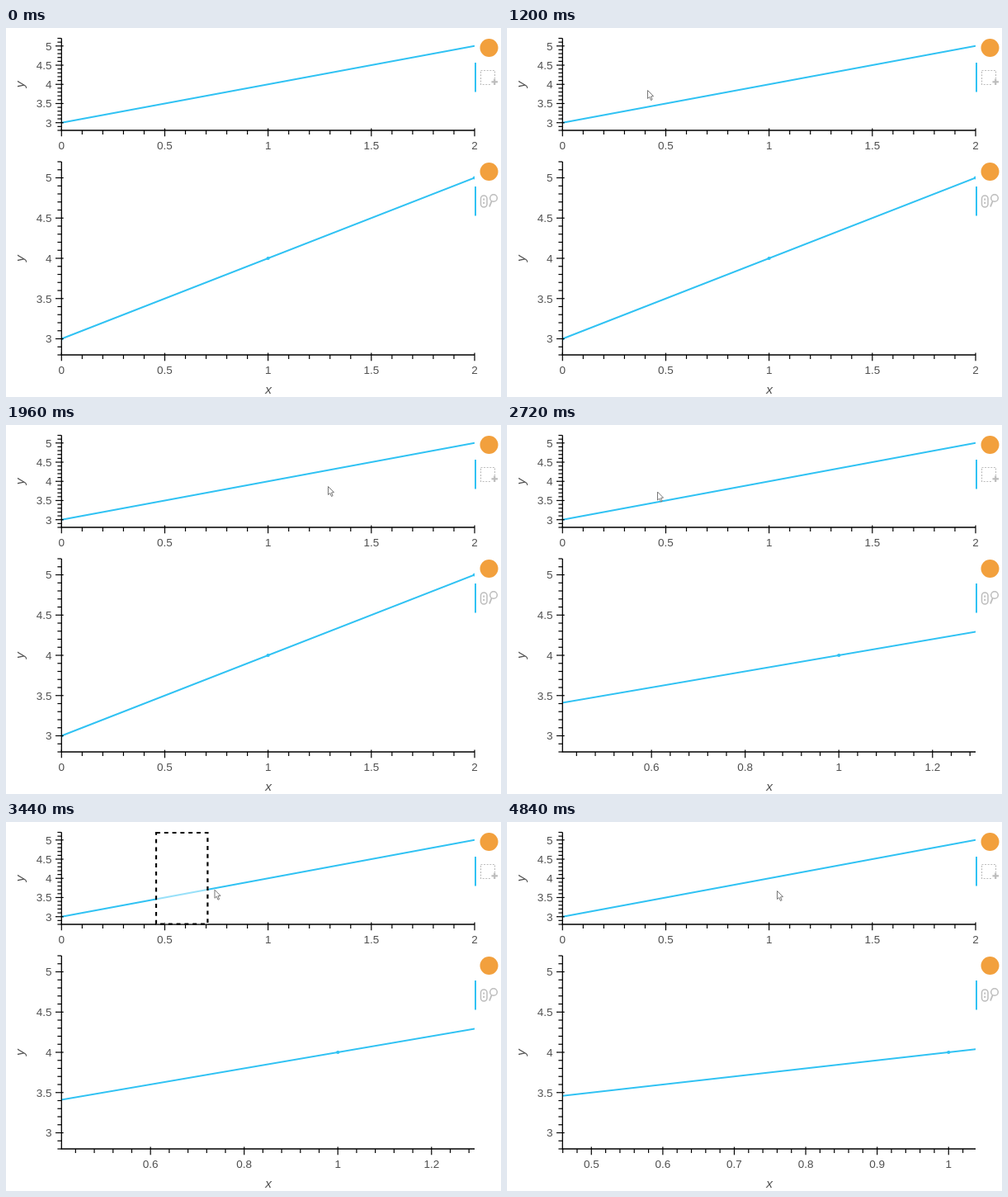
An HTML page with a canvas that plays this animation: 600x447 px, repeating every 4920 ms.

```html
<!DOCTYPE html>
<html lang="en">
<head>
<meta charset="utf-8">
<title>Linked range selection</title>
<style>
  html, body { margin: 0; width: 100%; height: 100%; overflow: hidden; background: #fff; }
  canvas { display: block; }
</style>
</head>
<body>
<canvas id="stage" width="600" height="447"></canvas>
<script>
const ctx = document.getElementById('stage').getContext('2d');
const LOOP = 4920, STEP = 40;
const LEFT = 67.3, RIGHT = 568, BLUE = '#30c2f3', GREY = '#bdbdbd';
const Y_RANGE = [2.8, 5.2], FULL = [0, 2];

// Pointer waypoints: time, x, y
const PATH = [
  [80, 330, 300], [640, 250, 110], [1120, 170.5, 75.5], [1240, 170.5, 75.5],
  [1920, 390.5, 74.5], [2280, 390.5, 74.5], [2680, 182.5, 81], [3020, 182.5, 81],
  [3880, 327.5, 83.5], [LOOP, 327.5, 83.5]
];
const DRAGS = [[1240, 1960], [3020, 3960]];
const ZOOMS = [[0, FULL], [2000, [0.41, 1.292]], [4000, [0.4596, 1.0378]]];

const mix = (a, b, p) => a + (b - a) * p;
const ease = p => mix(p, p * p * (3 - 2 * p), 0.4);

function pointerAt(t) {
  const i = PATH.findIndex(k => k[0] > t);
  if (i < 1) return null;
  const [t0, x0, y0] = PATH[i - 1], [t1, x1, y1] = PATH[i];
  const p = ease((t - t0) / (t1 - t0));
  return [mix(x0, x1, p), mix(y0, y1, p)];
}

function stroke(points, color, width, dash = []) {
  ctx.beginPath();
  points.forEach(([x, y]) => ctx.lineTo(x, y));
  ctx.strokeStyle = color;
  ctx.lineWidth = width;
  ctx.setLineDash(dash);
  ctx.stroke();
  ctx.setLineDash([]);
}

function circle(x, y, r, fill) {
  ctx.beginPath();
  ctx.arc(x, y, r, 0, 7);
  if (fill) {
    ctx.fillStyle = fill;
    ctx.fill();
  } else ctx.stroke();
}

function text(s, x, y, align, font = '13.5px') {
  ctx.font = `${font} "Liberation Sans", Arial, sans-serif`;
  ctx.fillStyle = '#505050';
  ctx.textAlign = align;
  ctx.textBaseline = 'alphabetic';
  ctx.fillText(s, x, y);
}

function eachTick([lo, hi], major, draw) {
  const minor = major / 5;
  for (let n = Math.ceil(lo / minor - 1e-6); n <= hi / minor + 1e-6; n++) {
    draw(n * minor, n % 5 === 0, String(+(n * minor).toFixed(2)));
  }
}

function plot(top, bottom, xRange, xStep, dots) {
  const px = v => mix(LEFT, RIGHT, (v - xRange[0]) / (xRange[1] - xRange[0]));
  const py = v => mix(bottom, top, (v - Y_RANGE[0]) / (Y_RANGE[1] - Y_RANGE[0]));

  ctx.save();
  ctx.beginPath();
  ctx.rect(LEFT, top, RIGHT - LEFT, bottom - top);
  ctx.clip();
  stroke([[px(0), py(3)], [px(2), py(5)]], BLUE, 2);
  if (dots) [0, 1, 2].forEach(v => circle(px(v), py(v + 3), 2.1, BLUE));
  ctx.restore();

  stroke([[LEFT, top], [LEFT, bottom], [RIGHT, bottom]], '#000', 1.3);
  eachTick(xRange, xStep, (v, major, label) => {
    const x = px(v);
    stroke([[x, bottom - (major ? 2.4 : 0)], [x, bottom + (major ? 7.3 : 4.9)]], '#000', 1.2);
    if (major) text(label, x, bottom + 23, 'center');
  });
  eachTick(Y_RANGE, 0.5, (v, major, label) => {
    const y = py(v);
    stroke([[LEFT - (major ? 7.3 : 4.9), y], [LEFT + (major ? 2.4 : 0), y]], '#000', 1.2);
    if (major) text(label, 55.5, y + 4.8, 'right');
  });

  ctx.save();
  ctx.translate(21.5, (top + bottom) / 2);
  ctx.rotate(-Math.PI / 2);
  text('y', 0, 0, 'center', 'italic 15.5px');
  ctx.restore();
}

function toolbar(y) {
  circle(585.5, y + 12, 11, '#f2a03d');
  ctx.fillStyle = BLUE;
  ctx.fillRect(568, y + 30, 2, 35.5);
}

function selectIcon() {
  ctx.strokeStyle = GREY;
  ctx.lineWidth = 1.2;
  ctx.setLineDash([2, 1.6]);
  ctx.strokeRect(575.5, 51.5, 17, 17);
  ctx.setLineDash([]);
  ctx.clearRect(588, 61, 9, 9);
  stroke([[588.5, 65.3], [596, 65.3]], GREY, 2.2);
  stroke([[592.2, 61.5], [592.2, 69]], GREY, 2.2);
}

function zoomIcon() {
  ctx.strokeStyle = GREY;
  ctx.lineWidth = 1.5;
  ctx.beginPath();
  ctx.roundRect(575.5, 203, 7.5, 14, 3.7);
  ctx.stroke();
  stroke([[579.2, 206.5], [579.2, 213.5]], GREY, 1.8, [2.2, 2]);
  stroke([[588.5, 210], [586, 216.5]], GREY, 1.8);
  ctx.lineWidth = 1.5;
  circle(591, 206, 4.3);
}

function selection(x0, x1) {
  const w = x1 - x0;
  ctx.fillStyle = 'rgba(255,255,255,0.5)';
  ctx.fillRect(x0, 13, w, 110.5);
  ctx.strokeStyle = '#000';
  ctx.lineWidth = 2.2;
  ctx.setLineDash([4.9, 4.9]);
  ctx.strokeRect(x0, 13, w, 110.5);
  ctx.setLineDash([]);
}

function pointer(x, y) {
  ctx.save();
  ctx.translate(x, y);
  ctx.beginPath();
  [[0, 0], [0, 10], [2.3, 8], [4, 12], [5.6, 11.2], [4, 7.4], [7, 7.1]]
    .forEach(([a, b]) => ctx.lineTo(a, b));
  ctx.closePath();
  ctx.fillStyle = '#fff';
  ctx.fill();
  ctx.strokeStyle = '#777';
  ctx.lineWidth = 1;
  ctx.stroke();
  ctx.restore();
}

function draw(t) {
  ctx.fillStyle = '#fff';
  ctx.fillRect(0, 0, 600, 447);
  const range = ZOOMS.filter(z => z[0] <= t).pop()[1];
  const span = range[1] - range[0];

  plot(12.5, 124, FULL, 0.5, false);
  plot(162, 396, range, span > 1 ? 0.5 : span > 0.7 ? 0.2 : 0.1, true);
  text('x', 318, 442.5, 'center', 'italic 15.5px');
  toolbar(12);
  selectIcon();
  toolbar(162);
  zoomIcon();

  // The selection edge trails the pointer by one step
  const drag = DRAGS.find(([a, b]) => t > a + STEP && t < b);
  if (drag) selection(pointerAt(drag[0])[0] - 0.5, pointerAt(t - STEP)[0] - 0.5);
  const at = pointerAt(t);
  if (at) pointer(...at);
}

const start = performance.now();
function frame() {
  const t = (performance.now() - start) % LOOP;
  draw(Math.floor(t / STEP) * STEP);
  requestAnimationFrame(frame);
}
frame();
</script>
</body>
</html>
```
